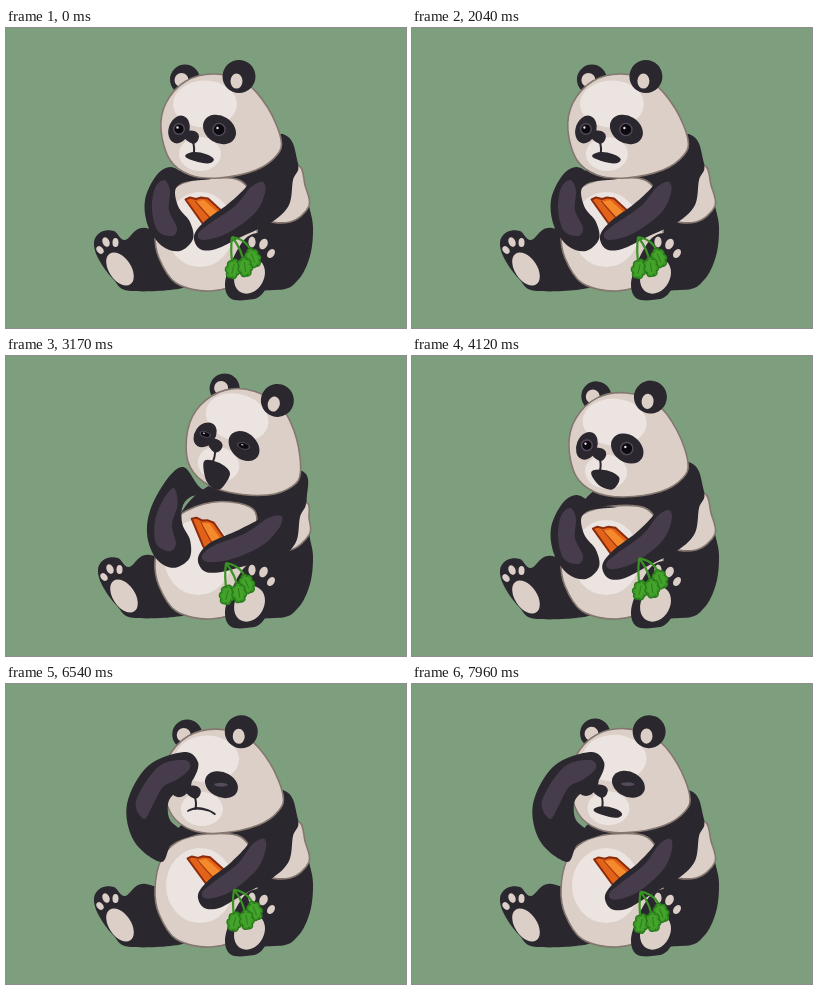
Write an HTML page that moves like this. It is 400x300 px and loops after 8 s.

```html
<!DOCTYPE html>
<html lang="en">
<head>
<meta charset="utf-8">
<title>Panda with a carrot</title>
<style>
  html, body { margin: 0; width: 100%; height: 100%; overflow: hidden; background: #7e9f7d; }
  svg { display: block; width: 100vw; height: 100vh; }
  .dark { fill: #2b272e; }
  .sheen { fill: #463c4b; }
  .fur { fill: #dccfc8; }
  .edge { stroke: #84776f; stroke-width: 1.6; }
  .pale { fill: #ece4e0; }
  .line { fill: none; stroke: #2b272e; stroke-width: 2; stroke-linecap: round; }
</style>
</head>
<body>
<svg viewBox="0 0 400 300">
  <g id="leg">
    <path id="legShape" class="dark"/>
    <g class="fur">
      <ellipse cx="114" cy="241" rx="11" ry="18.5" transform="rotate(-34 114 241)"/>
      <ellipse cx="94" cy="222" rx="3" ry="4.3" transform="rotate(-40 94 222)"/>
      <ellipse cx="100" cy="214" rx="3.4" ry="5" transform="rotate(-25 100 214)"/>
      <ellipse cx="109.5" cy="214.5" rx="3" ry="4.6"/>
    </g>
  </g>
  <path id="body" class="dark"/>
  <path id="patch" class="fur edge"/>
  <path id="belly" class="fur edge"/>
  <ellipse id="tummy" class="pale" cx="194" cy="201.5" rx="34" ry="37.5"/>
  <path id="foot" class="dark"/>
  <g class="fur">
    <ellipse cx="243.5" cy="248" rx="14.5" ry="18.5" transform="rotate(28 243.5 248)"/>
    <ellipse cx="246" cy="214" rx="3.6" ry="5.4"/>
    <ellipse cx="257.5" cy="216" rx="4" ry="5.6" transform="rotate(25 257.5 216)"/>
    <ellipse cx="265" cy="225.5" rx="3.4" ry="5" transform="rotate(35 265 225.5)"/>
  </g>
  <g id="carrot" stroke-linejoin="round">
    <path d="M179.500 171.500L184 169.500L190 171L195 169.500L202 170.500L232 198L216 212L197 196Z" fill="#e2621a" stroke="#8c2b0b" stroke-width="2"/>
    <path d="M188 174L198 172L220 192L214 198Z" fill="#f58a2c"/>
    <path d="M189 173L212 199" stroke="#a5390d" stroke-width="1.3"/>
  </g>
  <path id="arm" class="dark"/>
  <path id="armSheen" class="sheen"/>
  <g id="leaves"></g>
  <g id="head">
    <circle class="dark" cx="179" cy="51.5" r="15"/>
    <circle class="fur" cx="175.5" cy="52" r="7"/>
    <path id="skull" class="fur edge"/>
    <ellipse class="pale" cx="199" cy="76" rx="32" ry="23.5"/>
    <ellipse class="pale" cx="194" cy="126" rx="21" ry="17"/>
    <circle class="dark" cx="233" cy="48.5" r="16.5"/>
    <ellipse class="fur" cx="230.5" cy="53" rx="6" ry="7.6"/>
    <g class="mask"><ellipse class="dark" cx="173" cy="101.5" rx="10.3" ry="14.3" transform="rotate(18 173 101.5)"/></g>
    <g class="mask"><ellipse class="dark" cx="213.5" cy="101.5" rx="17.5" ry="13.5" transform="rotate(32 213.5 101.5)"/></g>
    <g class="eye"></g>
    <g class="eye"></g>
    <path class="dark" d="M177 107Q178 102 185 102.5Q193 103 193 109Q192 115 187 116Q179 113 177 107Z"/>
    <path class="line" d="M187 114Q189 121 187.5 126"/>
    <path id="mouth" class="dark" stroke="#2b272e" stroke-width="1.8" stroke-linejoin="round"/>
  </g>
  <g id="farArm">
    <path id="far" class="dark"/>
    <path id="farSheen" class="sheen"/>
  </g>
</svg>
<script>
const LOOP = 8000, CHEW = 680, TAU = Math.PI * 2;
const $ = id => document.getElementById(id);
const all = selector => [...document.querySelectorAll(selector)];
const points = text => text.split(' ').map(p => p.split(',').map(Number));
const mix = (a, b, k) => a + (b - a) * k;
const clamp = v => Math.min(1, Math.max(0, v));
const ramp = (t, from, to) => {
  const k = clamp((t - from) / (to - from));
  return k * k * (3 - 2 * k);
};

// Closed Catmull-Rom curve through the points
function curve(pts) {
  const n = pts.length, at = i => pts[(i + n) % n];
  let d = 'M' + pts[0];
  for (let i = 0; i < n; i++) {
    const [a, b, c, e] = [at(i - 1), at(i), at(i + 1), at(i + 2)];
    d += `C${b[0] + (c[0] - a[0]) / 6},${b[1] + (c[1] - a[1]) / 6} `
       + `${c[0] - (e[0] - b[0]) / 6},${c[1] - (e[1] - b[1]) / 6} ${c}`;
  }
  return d + 'Z';
}
const draw = (id, pts) => $(id).setAttribute('d', curve(pts));
const place = (el, transform) => el.setAttribute('transform', transform);

draw('legShape', points('88,214 95,204 108,203 119,212 140,200 190,225 185,257 125,263 107,251 92,230'));
draw('foot', points('219,256 224,270 240,272 257,265 274,228 268,210 252,205 238,212 225,235'));
draw('skull', points('155,102 160,75 180,53 209,46 240,55 262,80 275,111 271,127 250,142 213,150 184,147 164,132'));

const body = points('275,106 293,138 303,178 307,200 304,228 292,252 270,262 200,255 165,200 168,152 200,125');
const patch = points('293,138 272,150 256,188 284,194 303,178 299,157');
const belly = points('149,205 155,176 171,158 200,150 235,153 250,180 250,215 240,250 205,263 170,255 153,230');
const arm = points('246,146 240,159 222,176 199,193 188,208 194,221 210,221 235,209 266,194 283,177 287,152 292,137 275,106');
const armSheen = points('257,154 245,159 229,178 203,196 192,206 198,212 222,205 249,185 259,165');

const farRest = points('205,151 184,149 165,139 150,148 139,172 142,198 156,218 174,223 187,211 184,194 173,180 169,164 174,156 185,153');
const farFace = points('190,150 178,147 164,136 162,120 167,111 176,107 188,94 192,78 178,68 142,82 121,120 128,157 155,178 166,160');
const sheenRest = points('158,152 149,160 146,182 152,203 166,208 171,200 163,182 164,162');
const sheenFace = points('138,135 147,121 157,103 172,95 184,84 178,76 152,83 130,117');

// Leaning back pushes the shoulder right and lifts the hand
function leanBy([x, y], k) {
  const dx = x > 265 ? 7 + .4 * Math.max(0, 140 - y) : 4 + .35 * Math.max(0, 195 - y);
  return [x + dx * k, y + mix(-6, 9, clamp((x - 205) / 65)) * k];
}
const leanTorso = (pts, k) => pts.map(p => leanBy(p, k * clamp((180 - p[1]) / 40)));
const leanFar = (pts, k) => pts.map(([x, y]) => [
  x + (195 - y) * .23 * k,
  y + (-13 - .7 * Math.max(0, 160 - y) + .2 * (x - 165)) * k
]);

// Swings the far arm outward around the shoulder
const shoulder = [160, 150];
function swing(from, to, k) {
  const polar = ([x, y]) => [Math.hypot(x - shoulder[0], y - shoulder[1]),
                             Math.atan2(y - shoulder[1], x - shoulder[0])];
  return from.map((p, i) => {
    const [r0, a0] = polar(p), [r1, a1] = polar(to[i]);
    const turn = (a1 - a0 + .5 + 2 * TAU) % TAU - .5;
    let r = mix(r0, r1, k);
    r *= 1 - .45 * Math.sin(Math.PI * k) * clamp(r / 70);
    const a = a0 + turn * k;
    return [shoulder[0] + r * Math.cos(a), shoulder[1] + r * Math.sin(a)];
  });
}

const eyes = [[173, 101, 6], [213, 101.5, 6.8]];
const eyeGroups = all('.eye'), masks = all('.mask');
eyes.forEach(([x, y, r], i) => {
  eyeGroups[i].innerHTML = `<circle cx="${x}" cy="${y}" r="${r}" fill="#554b5c"/>
    <g class="pupil"><circle cx="${x}" cy="${y}" r="${r - 1.4}" fill="#0d0b10"/>
    <circle cx="${x - 1.5}" cy="${y - 1.5}" r="1.2" fill="#e8e2ea"/></g>`;
});
const pupils = all('.pupil');

// Scalloped leaf clump on a stem
function clump([x, y, tilt]) {
  let dots = '';
  for (let i = 0; i < 7; i++) {
    const a = i * TAU / 7;
    dots += `<circle cx="${x + 4 * Math.sin(a)}" cy="${y - 6.5 * Math.cos(a)}" r="3.5"/>`;
  }
  return `<path d="M226 209Q${x - 3} ${y - 18} ${x} ${y}" fill="none" stroke="#3a9425" stroke-width="2.2"/>
    <g transform="rotate(${tilt} ${x} ${y})"><g fill="#3c9a26" stroke="#2b7a1b" stroke-width="1.4">${dots}</g>
    <ellipse cx="${x}" cy="${y}" rx="5" ry="7.5" fill="#43a32b"/>
    <path d="M${x} ${y - 5}V${y + 5}" stroke="#2f841e" stroke-width="1.2"/></g>`;
}
$('leaves').innerHTML = [[247, 230, -22], [227, 241, 14], [239, 239, -8]].map(clump).join('');

// time, x, y, turn
const headKeys = [
  [0, 0, 0, 0], [2520, 1, 0, 0], [3100, 25.5, -11.5, 16], [3380, 25.5, -11.5, 16],
  [4080, 2, -9, 4], [4700, 3, -2, 2], [5340, 2, -.5, .5], [6540, 2, -.5, .5], [7960, 3, -1, 1.5]
];
// time, opening, chewing
const mouthKeys = [
  [0, 7, 3], [2480, 7, 1], [3100, 22, 0], [3380, 22, 0], [4100, 15, 0],
  [4700, 9, 0], [5340, 6, 2], [5800, 5, 3], [6540, 2, 3], [7960, 9, 2]
];
function sample(keys, t) {
  let i = 0;
  while (i < keys.length - 2 && t >= keys[i + 1][0]) i++;
  const [a, b] = [keys[i], keys[i + 1]], k = ramp(t, a[0], b[0]);
  return a.slice(1).map((v, j) => mix(v, b[j + 1], k));
}

function render(t) {
  const [headX, headY, turn] = sample(headKeys, t);
  const [open, chew] = sample(mouthKeys, t);
  const beat = Math.sin(t / CHEW * TAU) * chew / 3;
  const lean = ramp(t, 2520, 3100) - ramp(t, 3380, 4080);
  const raise = ramp(t, 4200, 4700);
  const settle = ramp(t, 3400, 4700), late = ramp(t, 6600, 7960);
  const eye = 1 - .5 * lean - .73 * ramp(t, 5080, 5340);
  const handX = 4 * settle + late, handY = 2 * settle + late - beat;
  const leafY = -4 * settle - 18 * settle * (1 - settle) + 2 * late - beat;

  draw('body', leanTorso(body, lean));
  draw('patch', leanTorso(patch, lean));
  draw('belly', leanTorso(belly, lean));
  place($('leg'), `translate(${4 * lean} ${-lean})`);
  place($('tummy'), `translate(${-2 * lean} 0)`);

  const pull = p => {
    const [x, y] = leanBy(p, lean), w = clamp((270 - p[0]) / 60);
    return [x + handX * w, y + handY * w];
  };
  draw('arm', arm.map(pull));
  draw('armSheen', armSheen.map(pull));
  place($('carrot'), `translate(${handX * .6 - 2 * lean} ${handY - 4 * lean}) rotate(${13 * lean + beat} 205 205)`);
  place($('leaves'), `translate(${handX * .5 - 6 * lean} ${leafY - 2 * lean}) rotate(${-beat} 226 209)`);

  draw('far', leanFar(swing(farRest, farFace, raise), lean));
  draw('farSheen', leanFar(swing(sheenRest, sheenFace, raise), lean));
  place($('farArm'), `translate(${5 * (ramp(t, 4440, 4700) - ramp(t, 5080, 5500))} 0)`);

  place($('head'), `translate(${headX} ${headY + beat * .5}) rotate(${turn + beat * .3} 213 98)`);
  eyes.forEach(([, y], i) => {
    const squash = s => `translate(0 ${y * (1 - s)}) scale(1 ${s})`;
    place(eyeGroups[i], squash(eye));
    place(masks[i], squash(mix(.88, 1, eye)));
    pupils[i].setAttribute('opacity', clamp((eye - .3) * 5));
  });
  const gap = Math.max(0, open + beat * 3);
  draw('mouth', [[180, 128], [188, 125], [200, 127], [207, 131 + gap * .1],
                 [201, 127.5 + gap], [188, 125.5 + gap * .9]]);
}

const start = performance.now();
function tick(now) {
  render(Math.max(0, now - start) % LOOP);
  requestAnimationFrame(tick);
}
render(0);
requestAnimationFrame(tick);
</script>
</body>
</html>
```
